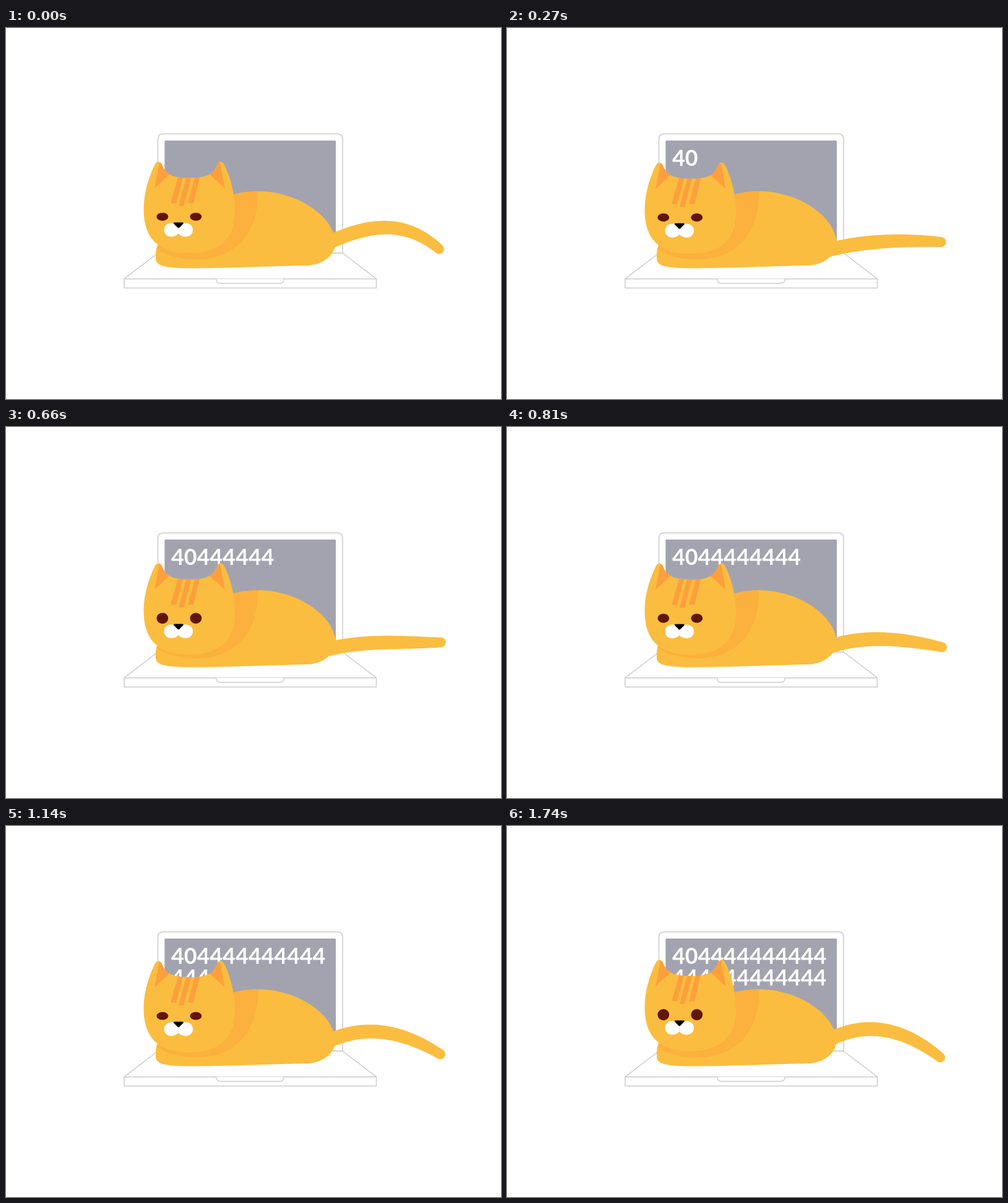
These frames come from a looping animation (800x600 px, 1800 ms). An HTML page:

```html
<!DOCTYPE html>
<html lang="en">
<head>
<meta charset="utf-8">
<title>Cat on a laptop</title>
<style>
html, body { margin: 0; width: 100%; height: 100%; overflow: hidden; background: #fff; }
svg { display: block; width: 800px; height: 600px; }
text { font: 700 35.85px Lato, "Open Sans", sans-serif; fill: #fff; }
.line { fill: #fff; stroke: #ccc; stroke-width: 1.5; stroke-linejoin: round; }
.fur { fill: #fbbd3f; }
.shade { fill: #fcb03d; }
.mark { fill: #fd9f3c; }
.eye { fill: #611505; }
</style>
</head>
<body>
<svg viewBox="0 0 800 600">
  <defs>
    <path id="skull" d="M241 220Q246 213 251 219C257 235 266 242.500 297 242.500C328 242.500 336 235 342 219Q347 213 352 220C362 238 370 268 370 297C370 340 346 364 296 364C245 364 222.500 339 222.500 293C222.500 265 232 238 241 220Z"/>
    <clipPath id="inSkull"><use href="#skull"/></clipPath>
  </defs>

  <g class="line">
    <path d="M245.5 364V180Q245.5 171.3 254 171.3H535.5Q544 171.3 544 180V364Z"/>
    <path d="M245.5 364H544L598.5 405.7H191Z"/>
    <path d="M191 405.7H598.5V420.5H191Z"/>
    <path d="M339.5 405.7Q340 413 347 413H442Q449 413 449.5 405.7"/>
  </g>
  <rect x="256.3" y="182" width="276.7" height="163" rx="1.5" fill="#a3a3af"/>
  <text id="row1" x="267" y="222.5"></text>
  <text id="row2" x="267" y="257.8"></text>

  <path id="tail" class="fur"/>
  <path class="fur" d="M245 352C241 360 242 368 242 373C243 384 252 388.500 300 388.500C350 388.500 420 385.500 487 384C515 383 533 365 533 345C526 300 467 264 407 264Q385 264 365 270Z"/>
  <path class="shade" d="M407 264C409 320 380 374 308 374C280 374 255 367 243 357L246 350L300 300L365 270Q385 264 407 264Z"/>

  <g id="head">
    <use href="#skull" class="fur"/>
    <g class="mark" clip-path="url(#inSkull)">
      <path d="M248 218L240 259L264 237L254 218ZM346 218L353.500 259L329 237L339 218Z"/>
      <path d="M279 238H287L275 283.500H266ZM292.500 238H300.500L287 288H279ZM306 238H314L303 283.500H294Z"/>
    </g>
    <ellipse class="eye" cx="252.8" cy="305.2" rx="9.4"/>
    <ellipse class="eye" cx="306.8" cy="305.2" rx="9.4"/>
    <path fill="#fff" d="M266.500 315.500A11 11 0 0 0 266.500 337.500Q274 337.500 278.700 332.500Q283 337.500 291 337.500A11 11 0 0 0 291 315.500Z"/>
    <path d="M272 314.500H285.500Q287.500 315 286.500 316.500L280 323Q278.700 324 277.500 323L271 316.500Q270 315 272 314.500Z"/>
  </g>
</svg>
<script>
const LOOP = 1800, STEP = 30, REST = 1500, TURN = 510;
const $ = id => document.getElementById(id);
const eyes = document.querySelectorAll('.eye');

// tail heights from root to tip in three poses
const curled = [343, 319, 308, 357.5];
const flat = [361, 352, 354.5, 342];
const drooped = [341, 316, 329, 374];

const ease = u => (1 - Math.cos(Math.PI * u ** 0.65)) / 2;
const wave = (t, period) => Math.cos(2 * Math.PI * t / period);
const blend = (a, b, u) => a.map((v, i) => v + (b[i] - v) * u);

const tailHeights = t => t < TURN
  ? blend(curled, flat, ease(t / TURN))
  : blend(flat, drooped, ease((t - TURN) / (REST - TURN)));

function bezier(p, u) {
  const v = 1 - u;
  return v * v * v * p[0] + 3 * v * v * u * p[1] + 3 * v * u * u * p[2] + u * u * u * p[3];
}

// tapered band around a curve, with a round tip
function tailPath(xs, ys) {
  const upper = [], lower = [], steps = 44, e = 0.001;
  for (let i = -4; i <= steps; i++) {
    const u = i / steps, x = bezier(xs, u), y = bezier(ys, u);
    const dx = bezier(xs, u + e) - x, dy = bezier(ys, u + e) - y;
    const k = (11.4 - 3.4 * u ** 3) / Math.hypot(dx, dy);
    upper.push([x + dy * k, y - dx * k]);
    lower.unshift([x - dy * k, y + dx * k]);
  }
  return `M${upper.join('L')}A8 8 0 0 1 ${lower.join('L')}Z`;
}

function draw(now) {
  const t = Math.floor(now % LOOP / STEP) * STEP;
  const count = Math.max(0, Math.floor((t - 125) / 66));
  const digits = '40'.padEnd(24, '4').slice(0, count);
  $('row1').textContent = digits.slice(0, 12);
  $('row2').textContent = digits.slice(12);

  const m = Math.min(t, REST);
  const tipX = 700 + 3 * Math.sin(Math.PI * m / REST);
  $('tail').setAttribute('d', tailPath([530, 587, 643, tipX], tailHeights(m)));
  $('head').setAttribute('transform', `translate(0 ${2.1 * (1 - wave(m, REST))})`);
  eyes.forEach(eye => eye.setAttribute('ry', 7.5 - 1.6 * wave(m - 130, 900)));
}

const start = performance.now();
function tick() {
  draw(performance.now() - start);
  requestAnimationFrame(tick);
}
tick();
</script>
</body>
</html>
```
